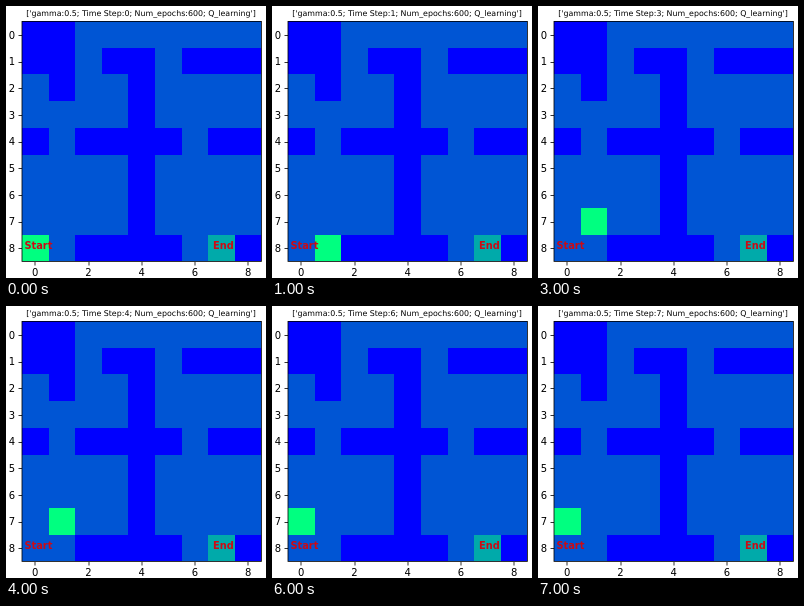
Recreate the animation shown at these times as an HTML page with a canvas. Size 260 by 272 pixels, loop 8 s.

```html
<!DOCTYPE html>
<html lang="en">
<head>
<meta charset="utf-8">
<style>
html, body { margin: 0; width: 100%; height: 100%; overflow: hidden; background: #fff; }
canvas { display: block; }
</style>
</head>
<body>
<canvas id="stage" width="260" height="272"></canvas>
<script>
const ctx = document.getElementById('stage').getContext('2d');
const STEP_MS = 1000;

// '#' wall, '.' corridor, 'E' end cell
const maze = [
  '##.......',
  '##.##.###',
  '.#..#....',
  '....#....',
  '#.####.##',
  '....#....',
  '....#....',
  '....#....',
  '..####.E#',
];
const colors = { '#': '#0000ff', '.': '#0055d4', E: '#00aaaa', agent: '#00ff80' };

// Agent cell [column, row] at each time step
const route = [[0, 8], [1, 8], [1, 7], [1, 7], [1, 7], [0, 7], [0, 7], [0, 7]];

const edgeX = col => Math.round(16 + col * 26.6);
const edgeY = row => Math.round(15 + row * 26.7);
const midX = col => 16 + (col + 0.5) * 26.6;
const midY = row => 15.5 + (row + 0.5) * 26.67;

function cell(col, row, color) {
  const x = edgeX(col), y = edgeY(row);
  ctx.fillStyle = color;
  ctx.fillRect(x, y, edgeX(col + 1) - x, edgeY(row + 1) - y);
}

function label(text, x, y, size, align, color = '#000', weight = 'normal') {
  ctx.font = `${weight} ${size}px "DejaVu Sans", sans-serif`;
  ctx.textAlign = align;
  ctx.fillStyle = color;
  ctx.fillText(text, x, y);
}

function drawAxes() {
  ctx.fillStyle = '#000';
  for (let i = 0; i < 9; i++) {
    ctx.fillRect(12.5, Math.round(midY(i)), 3.5, 0.8);
    if (i % 2 === 0) ctx.fillRect(Math.round(midX(i)) - 0.4, 256, 0.8, 3.5);
  }
  ctx.strokeStyle = '#000';
  ctx.lineWidth = 0.8;
  ctx.strokeRect(16, 15.5, 239.5, 240);
  for (let i = 0; i < 9; i++) {
    label(i, 9, midY(i) + 3.7, 10, 'right');
    if (i % 2 === 0) label(i, midX(i), 270, 10, 'center');
  }
}

function draw(step) {
  ctx.fillStyle = '#fff';
  ctx.fillRect(0, 0, 260, 272);
  maze.forEach((line, row) => [...line].forEach((kind, col) => cell(col, row, colors[kind])));
  cell(...route[step], colors.agent);
  drawAxes();
  label('Start', 18.5, 243, 9.8, 'left', '#cc0a14', 'bold');
  label('End', 207, 243, 9.8, 'left', '#cc0a14', 'bold');
  label(`['gamma:0.5; Time Step:${step}; Num_epochs:600; Q_learning']`, 135, 9.5, 7.9, 'center');
}

function tick() {
  draw(Math.floor(performance.now() / STEP_MS) % route.length);
  requestAnimationFrame(tick);
}
tick();
</script>
</body>
</html>
```
